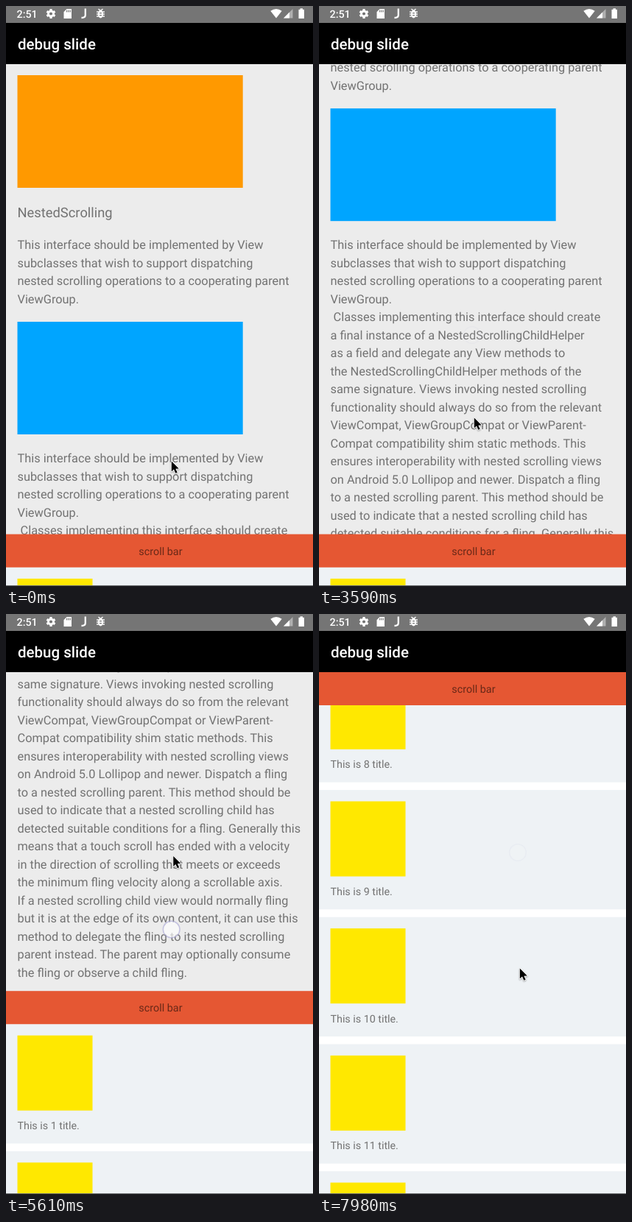
These frames come from a looping animation (417 px wide and 788 px high, 8 s). An HTML page with a canvas:

```html
<!DOCTYPE html>
<html lang="en">
<head>
<meta charset="utf-8">
<title>debug slide</title>
<style>
html, body { margin: 0; width: 100%; height: 100%; overflow: hidden; background: #fff; }
canvas { display: block; width: 417px; height: 788px; }
</style>
</head>
<body>
<canvas id="stage" width="417" height="788"></canvas>
<script>
const ctx = document.getElementById('stage').getContext('2d');
const W = 417, H = 788, LOOP = 8000;
const TOP = 79, BAR_REST = 717.6, BAR_H = 45;
const INNER = 510, OUTER = BAR_REST - TOP;
const PITCH = 172.67, MARGIN = 15.5;
const FONT = 'Roboto, sans-serif';
const GREY = '#727272';

const INTRO = [
  'This interface should be implemented by View',
  'subclasses that wish to support dispatching',
  'nested scrolling operations to a cooperating parent',
  'ViewGroup.'
];
const BODY = [
  ...INTRO,
  ' Classes implementing this interface should create',
  'a final instance of a NestedScrollingChildHelper',
  'as a field and delegate any View methods to',
  'the NestedScrollingChildHelper methods of the',
  'same signature. Views invoking nested scrolling',
  'functionality should always do so from the relevant',
  'ViewCompat, ViewGroupCompat or ViewParent-',
  'Compat compatibility shim static methods. This',
  'ensures interoperability with nested scrolling views',
  'on Android 5.0 Lollipop and newer. Dispatch a fling',
  'to a nested scrolling parent. This method should be',
  'used to indicate that a nested scrolling child has',
  'detected suitable conditions for a fling. Generally this',
  'means that a touch scroll has ended with a velocity',
  'in the direction of scrolling that meets or exceeds',
  'the minimum fling velocity along a scrollable axis.',
  'If a nested scrolling child view would normally fling',
  'but it is at the edge of its own content, it can use this',
  'method to delegate the fling to its nested scrolling',
  'parent instead. The parent may optionally consume',
  'the fling or observe a child fling.'
];

// The touch trails the cursor; after lifting, the page flings on and the cursor returns to rest.
const LAG = 45, LIFT = 40, RETURN = 140, FLING = 400, FADE = 160;
const START = [224, 618];
const HOVERS = [
  { start: 500, end: 590, to: [179, 625] },
  { start: 1190, end: 1360, to: [179, 595] },
  { start: 1600, end: 1710, to: [187, 620] }
];
const GESTURES = [
  { press: 2000, release: 2530, lift: 2700, to: [197, 567], rest: [197, 567], fling: 0 },
  { press: 2700, release: 3410, to: [206, 444], rest: [210, 559], fling: 196 },
  { press: 3620, release: 3740, to: [211, 450], rest: [211, 520], fling: 29 },
  { press: 4510, release: 4690, to: [218, 409], rest: [219, 520], fling: 0 },
  { press: 5500, release: 5650, to: [228, 290], rest: [236, 470], fling: 297.6 },
  { press: 6490, release: 6630, to: [237, 334], rest: [260, 481], fling: 616 },
  { press: 7680, release: 7800, to: [268, 321], rest: [272, 481], fling: 610 }
];
const MOVES = [...HOVERS];
for (const g of GESTURES) {
  g.lift ??= g.release + LIFT;
  g.travel = MOVES[MOVES.length - 1].to[1] - g.to[1];
  MOVES.push({ start: g.press, end: g.release, to: g.to },
             { start: g.lift, end: g.lift + RETURN, to: g.rest });
}

const progress = (t, start, end) => Math.min(1, Math.max(0, (t - start) / (end - start)));
const smooth = u => u * u * (3 - 2 * u);
const easeOut = u => u * (2 - u);

function cursorAt(t) {
  return MOVES.reduce((at, { start, end, to }) => {
    const u = smooth(progress(t, start, end));
    return at.map((v, i) => v + (to[i] - v) * u);
  }, START);
}

function scrollAt(t) {
  return GESTURES.reduce((sum, g) => sum
    + g.travel * smooth(progress(t - LAG, g.press, g.release))
    + g.fling * easeOut(progress(t, g.lift, g.lift + FLING)), 0);
}

function rect(x, y, w, h, color) {
  ctx.fillStyle = color;
  ctx.fillRect(x, y, w, h);
}

function text(str, x, y, size, color, weight = 400, align = 'left') {
  ctx.font = `${weight} ${size}px ${FONT}`;
  ctx.textRendering = 'geometricPrecision';
  ctx.fillStyle = color;
  ctx.textAlign = align;
  ctx.fillText(str, x, y);
}

function trace(points) {
  ctx.beginPath();
  points.forEach(([x, y]) => ctx.lineTo(x, y));
}

function poly(points, color) {
  trace(points);
  ctx.fillStyle = color;
  ctx.fill();
}

function line(points, width) {
  trace(points);
  ctx.lineWidth = width;
  ctx.stroke();
}

function clipped(y, bottom, paint) {
  ctx.save();
  ctx.beginPath();
  ctx.rect(0, y, W, bottom - y);
  ctx.clip();
  paint();
  ctx.restore();
}

function drawArticle(offset) {
  const lines = (list, y) => list.forEach((s, i) =>
    text(s, MARGIN, y + i * 24.5 - offset, 16.34, GREY));
  rect(0, TOP, W, H, '#ececec');
  rect(MARGIN, 94 - offset, 306.2, 153, '#ff9900');
  text('NestedScrolling', MARGIN, 287 - offset, 18.35, GREY);
  lines(INTRO, 330);
  rect(MARGIN, 429 - offset, 306.2, 153, '#00a5ff');
  lines(BODY, 620);
}

function drawList(top, offset) {
  rect(0, top, W, H, '#fff');
  for (let i = Math.floor(offset / PITCH); ; i++) {
    const y = top - offset + i * PITCH;
    if (y > H) break;
    rect(0, y, W, 162.2, '#eef2f5');
    rect(MARGIN, y + 15.4, 102, 102, '#ffe800');
    text(`This is ${i + 1} title.`, MARGIN, y + 143, 14.29, GREY);
  }
}

function drawStatusBar() {
  rect(0, 0, W, 23, '#757575');
  text('2:51', 14.5, 15.8, 14.3, '#fff', 500);
  ctx.strokeStyle = '#fff';

  // Gear
  ctx.save();
  ctx.translate(61, 10.5);
  for (let i = 0; i < 6; i++) {
    ctx.rotate(Math.PI / 3);
    rect(-1.6, -6.4, 3.2, 4, '#fff');
  }
  ctx.beginPath();
  ctx.arc(0, 0, 3.5, 0, 7);
  ctx.lineWidth = 2.8;
  ctx.stroke();
  ctx.restore();

  // Memory card and letter
  poly([[82.5, 4], [89, 4], [89, 17], [78.5, 17], [78.5, 8]], '#fff');
  for (let x = 82; x < 88; x += 2.3) rect(x, 5.6, 1.2, 2.8, '#757575');
  ctx.beginPath();
  ctx.moveTo(107.8, 3.6);
  ctx.lineTo(107.8, 12.5);
  ctx.quadraticCurveTo(107.6, 16, 102.5, 16);
  ctx.lineWidth = 2.3;
  ctx.stroke();

  // Bug
  ctx.beginPath();
  ctx.ellipse(128.5, 11, 3.5, 5.4, 0, 0, 7);
  ctx.fillStyle = '#fff';
  ctx.fill();
  for (let y = 8; y <= 14; y += 3) line([[123, y], [134, y]], 1.4);
  line([[125.5, 4], [128.5, 6.5], [131.5, 4]], 1.4);
  rect(127, 9, 3, 1.2, '#757575');
  rect(127, 12, 3, 1.2, '#757575');

  // Wi-Fi, signal, battery
  ctx.beginPath();
  ctx.moveTo(367, 16.5);
  ctx.lineTo(359.3, 6.8);
  ctx.quadraticCurveTo(367, 1.2, 374.7, 6.8);
  ctx.fillStyle = '#fff';
  ctx.fill();
  poly([[389.5, 4], [389.5, 16.5], [377, 16.5]], '#b0b0b0');
  poly([[385, 8.5], [385, 16.5], [377, 16.5]], '#fff');
  rect(397.5, 4.8, 7.5, 12.2, '#fff');
  rect(399.5, 3.3, 3.5, 2, '#fff');
}

function drawTouch({ press, release, lift }, t) {
  if (t < press || t > lift + FADE) return;
  const [x, y] = cursorAt(Math.min(t, release + LAG) - LAG);
  ctx.globalAlpha = 1 - progress(t, lift, lift + FADE);
  ctx.beginPath();
  ctx.arc(x + 2, y + 3, 11.3, 0, 7);
  ctx.fillStyle = 'rgba(255,255,255,.65)';
  ctx.fill();
  ctx.strokeStyle = 'rgba(150,145,205,.5)';
  ctx.lineWidth = 1.5;
  ctx.stroke();
  ctx.globalAlpha = 1;
}

function drawCursor([x, y]) {
  ctx.save();
  ctx.translate(x + 0.8, y + 0.5);
  ctx.shadowColor = 'rgba(0,0,0,.35)';
  ctx.shadowBlur = 2;
  ctx.shadowOffsetY = 1;
  const arrow = [[0, 0], [0, 14], [3.2, 11], [5.5, 16.2], [7.9, 15.2], [5.6, 10.2], [10, 10]];
  ctx.lineJoin = 'round';
  ctx.strokeStyle = '#fff';
  line([...arrow, arrow[0]], 1.8);
  ctx.shadowColor = 'transparent';
  poly(arrow, '#000');
  ctx.restore();
}

function render(t) {
  const scroll = scrollAt(t);
  const lifted = Math.min(OUTER, Math.max(0, scroll - INNER));
  const barTop = BAR_REST - lifted, barBottom = barTop + BAR_H;

  clipped(TOP, barTop + 1, () => drawArticle(Math.min(scroll, INNER) + lifted));
  clipped(barBottom - 1, H, () => drawList(barBottom, Math.max(0, scroll - INNER - OUTER)));
  rect(0, barTop, W, BAR_H, '#e55733');
  text('scroll bar', 209.9, barTop + 28, 14.4, 'rgba(0,0,0,.54)', 400, 'center');

  rect(0, 23, W, TOP - 23, '#000');
  text('debug slide', 16, 58.5, 20.5, '#fff', 500);
  drawStatusBar();
  rect(0, 787, W, 1, '#6a6c6e');

  GESTURES.forEach(g => drawTouch(g, t));
  drawCursor(cursorAt(t));
}

const origin = performance.now();
function tick() {
  render((performance.now() - origin) % LOOP);
  requestAnimationFrame(tick);
}
tick();
</script>
</body>
</html>
```
